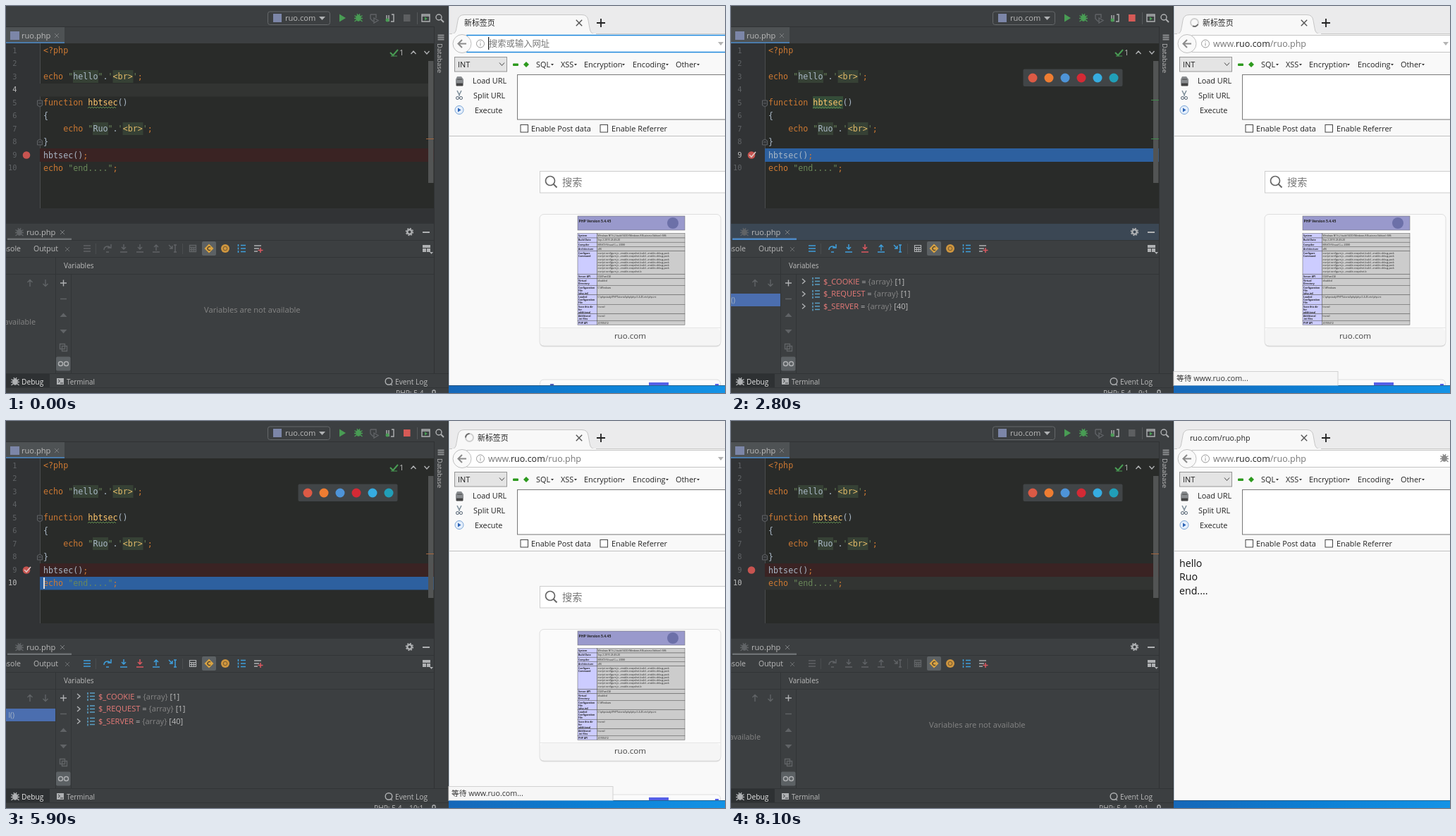
Write an HTML page that moves like this. It is 1020 px wide and 549 px high and loops after 8400 ms.

```html
<!DOCTYPE html>
<html lang="zh">
<head>
<meta charset="utf-8">
<title>PHP debugging</title>
<style>
html, body { margin: 0; width: 100%; height: 100%; overflow: hidden; background: #3c3f41; }
svg { display: block; width: 1020px; height: 549px; }
text { font: 10.2px "Open Sans", "Noto Sans CJK SC", sans-serif; fill: #bbb; white-space: pre; }
.m { font-size: 11.1px; }
.code text { font: 11.7px "DejaVu Sans Mono", monospace; fill: #a9b7c6; }
.nums text { font: 10.3px "DejaVu Sans Mono", monospace; fill: #606366; text-anchor: end; }
.nums .cur { fill: #b4b4b4; }
.code .k { fill: #cc7832; }
.code .s { fill: #6a8759; }
.code .g { fill: #e0b968; }
.code .f { fill: #ffc66d; }
.web text { font-size: 10.9px; fill: #222; }
.web .url { font-size: 12.5px; fill: #777; }
.web .dark { fill: #222; }
.web .page text { font-size: 14.2px; fill: #111; }
.tiny text { font-size: 3.4px; fill: #222; }
.tiny .b { font-weight: 700; }
.l { fill: none; stroke: #afb1b3; stroke-width: 1.4; }
.off { fill: none; stroke: #606366; stroke-width: 1.4; }
.blue { fill: none; stroke: #3f9fdb; stroke-width: 1.5; }
.var { fill: #e87b78; }
.dim { fill: #858585; }
.thin { fill: none; stroke: #999; stroke-width: 1; }
</style>
</head>
<body>
<svg viewBox="0 0 1020 549" xmlns="http://www.w3.org/2000/svg">
<defs>
  <linearGradient id="bar"><stop offset="0" stop-color="#1667b8"/><stop offset=".5" stop-color="#0c7fd4"/><stop offset="1" stop-color="#1493e6"/></linearGradient>
  <g id="bug"><ellipse rx="3.2" ry="4.2"/><path d="M-5.5-3.5l3 2M5.5-3.5l-3 2M-6 .5H6M-5.5 5l3-2.5M5.5 5L2.5 2.5M-2-6l1 2M2-6L1-4" fill="none" stroke-width="1.4"/></g>
  <g id="x"><path d="M-3-3L3 3M3-3L-3 3" fill="none" stroke-width="1"/></g>
  <g id="steps">
    <path d="M110 340h10M110 344h10M110 348h10"/>
    <path d="M139 346a5 5 0 0 1 9-3M149 338v5h-5M142 349h4"/>
    <path d="M167 338v7M164 342l3 3l3-3M162 349h10"/>
    <path d="M213 347v-7M210 342l3-3l3 3M208 349h10"/>
    <path d="M231 339l5 5M236 340v4h-4M240 339v10M238 339h4M238 349h4"/>
  </g>
  <g id="force"><path d="M190 338v7M187 342l3 3l3-3M185 349h10"/></g>
  <g id="calc"><path d="M260.500 339.500h9v9h-9zM260 342.500h10M263.500 342v6M266.500 342v6M260 345.500h10"/></g>
  <g id="list"><path d="M119 386h7M119 390.500h7M119 395h7M116 385v3M116 389.500v3M116 394v3" fill="none" stroke="#5a9fc4" stroke-width="1.5"/><path d="M101 387l4 3.500l-4 3.500" class="l"/></g>
</defs>

<!-- editor window -->
<rect width="628" height="549" fill="#3c3f41"/>
<path d="M0 29.500H607M607.500 29V522" stroke="#303234"/>
<rect x="371.500" y="8" width="88" height="18.500" rx="3" fill="none" stroke="#65686a"/>
<rect x="379" y="11" width="12" height="12" fill="#7c86a8"/>
<text class="m" x="396" y="21">ruo.com</text>
<path d="M444 15h9l-4.500 5z" fill="#afb1b3"/>
<path d="M473 11.500v11l9-5.500z" fill="#499c54"/>
<use href="#bug" x="500" y="17" fill="#499c54" stroke="#499c54"/>
<path d="M517 12h8v5M517 12v6l4 4M522 17l6 3.500l-6 3.500z" class="off"/>
<path d="M540 13v9M543 13v9M547 12h3v10h-4" class="l"/><circle cx="541" cy="20" r="2.500" fill="#499c54"/>
<rect x="564" y="12" width="9.500" height="10" fill="#5d5f61"/>
<rect data-on="2300 6700" x="564" y="12" width="9.500" height="10" fill="#d65a56"/>
<path d="M583.500 9V26" stroke="#55585a"/>
<path d="M590 12h11v10h-11zM590 14h11" class="l"/><path d="M594 15.500v5l4-2.500z" fill="#499c54"/>
<circle cx="614" cy="16" r="4" class="l"/><path d="M617 19l4 4" class="l" style="stroke-width:2"/>

<rect y="30" width="83" height="23" fill="#4e5254"/>
<rect y="51" width="83" height="2.500" fill="#4a88c7" opacity=".75"/>
<rect x="6" y="36" width="13" height="12" fill="#7c86a8"/>
<text class="m" x="22" y="46">ruo.php</text>
<use href="#x" x="72" y="42" stroke="#7b7e80"/>

<rect y="53" width="607" height="234" fill="#292b29"/>
<rect y="53" width="48" height="234" fill="#313335"/>
<path d="M48.500 53V287" stroke="#4a4c4d"/>
<rect y="287" width="607" height="21" fill="#313335"/>
<rect data-on="0 1600" x="48" y="110" width="552" height="18.500" fill="#323432"/>
<rect x="48" y="202" width="559" height="19" fill="#3a2323"/>
<rect data-on="1600 5400" x="48" y="202" width="559" height="19" fill="#2d609f"/>
<rect data-on="5400 6200" x="48" y="221" width="559" height="18.500" fill="#2d609f"/>
<rect data-on="6200 8400" x="48" y="221" width="552" height="18.500" fill="#323432"/>
<rect x="599" y="78" width="7.500" height="173" fill="#525454"/>
<path data-on="0 2300,5400 8400" d="M596 188.500H607" stroke="#a5663e"/>
<path data-on="2300 5400" d="M596 133.500H607M596 188.500H607" stroke="#3f8a4a"/>
<g fill="#364135">
  <rect x="95" y="91" width="36" height="18"/><rect x="151.500" y="91" width="29" height="18"/>
  <rect x="123" y="165" width="22" height="18"/><rect x="165.500" y="165" width="29" height="18"/>
  <rect data-on="2300 5400" x="116" y="128" width="43" height="18" fill="#344c38"/>
</g>
<path id="wave" fill="none" stroke="#5f8a4f"/>
<g class="nums" id="nums"></g>
<g class="code">
  <text class="k" x="53" y="67">&lt;?php</text>
  <text x="53" y="104"><tspan class="k">echo </tspan><tspan class="s">"</tspan>hello<tspan class="s">"</tspan>.<tspan class="s">'</tspan><tspan class="g">&lt;br&gt;</tspan><tspan class="s">'</tspan><tspan class="k">;</tspan></text>
  <text x="53" y="141"><tspan class="k">function </tspan><tspan class="f">hbtsec</tspan>()</text>
  <text x="53" y="160">{</text>
  <text x="53" y="178"><tspan class="k">    echo </tspan><tspan class="s">"</tspan>Ruo<tspan class="s">"</tspan>.<tspan class="s">'</tspan><tspan class="g">&lt;br&gt;</tspan><tspan class="s">'</tspan><tspan class="k">;</tspan></text>
  <text x="53" y="197">}</text>
  <text x="53" y="215.500">hbtsec()<tspan class="k">;</tspan></text>
  <text x="53" y="234"><tspan class="k">echo </tspan><tspan class="s">"end...."</tspan><tspan class="k">;</tspan></text>
</g>
<path d="M44.500 134h7v7l-3.500 2l-3.500-2zM46 138h4M44.500 197h7v-6l-3.500-2l-3.500 2zM46 193h4" fill="#313335" stroke="#606366"/>
<rect data-on="5400 7100,7600 8100" x="53" y="222" width="2" height="16" fill="#ddd"/>
<circle cx="29" cy="211.500" r="5.300" fill="#c75450"/>
<path data-on="1900 6500" d="M26 211l3 3l6-7" fill="none" stroke="#dfc7c4" stroke-width="1.600"/>
<rect x="539" y="56" width="68" height="20" fill="#292b29"/>
<path d="M545 66l4 4l7-8" fill="none" stroke="#499c54" stroke-width="2"/><path d="M546 71h9" stroke="#499c54"/>
<text class="m" x="558" y="70">1</text>
<path d="M574.500 68l3.500-4l3.500 4M593.500 64l3.500 4l3.500-4" class="l"/>
<g id="popup">
  <rect x="414.500" y="89.500" width="141" height="24.500" rx="2" fill="#414547"/>
  <circle cx="428" cy="102" r="6.500" fill="#dc5a45"/><circle cx="451" cy="102" r="6.500" fill="#ee7d32"/>
  <circle cx="474" cy="102" r="6.500" fill="#4e94d8"/><circle cx="497" cy="102" r="6.500" fill="#d42a35"/>
  <circle cx="520" cy="102" r="6.500" fill="#36ace0"/><circle cx="543" cy="102" r="6.500" fill="#219fb8"/>
</g>
<path d="M612 40h10v9h-10zM612 43h10M612 46h10" fill="#8b8e90" stroke="#3c3f41"/>
<text transform="translate(612 53) rotate(90)" style="font-size:9.600px">Database</text>

<!-- debug panel -->
<rect data-on="1900 5400" y="308" width="607" height="24" fill="#3b4754"/>
<path d="M0 308.500H607M0 332.500H607M0 356.500H607M0 380.500H607M70.500 357V521M92.500 380V521M0 521.500H628" stroke="#323537"/>
<rect x="2" y="329.500" width="91" height="2.500" fill="#6c7073"/>
<rect data-on="1900 5400" x="2" y="329.500" width="91" height="2.500" fill="#4a88c7"/>
<use href="#bug" x="19" y="321" fill="#606366" stroke="#606366"/>
<text class="m" x="29" y="325">ruo.php</text>
<use href="#x" x="80" y="321" stroke="#7b7e80"/>
<circle cx="572.500" cy="320.500" r="3.200" class="l" style="stroke-width:2.400"/><circle cx="572.500" cy="320.500" r="5" class="l" stroke-dasharray="2 1.900"/>
<path d="M591 321h10" class="l" style="stroke-width:2"/>
<text x="21" y="348" text-anchor="end" style="font-size:10.500px">Console</text>
<text x="39" y="348" style="font-size:10.500px">Output</text>
<use href="#x" x="87" y="345" stroke="#6b6e70"/>
<path d="M127.500 337v15M250.500 337v15" stroke="#4a4d4f"/>
<g data-on="0 1900,6200 8400" class="off"><use href="#steps"/><use href="#force"/><use href="#calc"/></g>
<g data-on="1900 6200"><use href="#steps" class="blue"/><use href="#force" class="blue" style="stroke:#db5860"/><use href="#calc" class="l" style="stroke-width:1.200"/></g>
<rect x="278" y="334" width="20" height="20" rx="2" fill="#5c6164"/>
<path d="M288 337.500l6.500 6.500l-6.500 6.500l-6.500-6.500z" fill="#d9a343"/><path d="M290 342a2.500 2.500 0 1 0 0 4" fill="none" stroke="#4b4030" stroke-width="1.300"/>
<circle cx="311" cy="344" r="6" fill="#cf963f"/><circle cx="311" cy="344" r="2.800" fill="none" stroke="#75592e"/>
<path d="M333 339.500h7M333 344h7M333 348.500h7M329.500 338v3M329.500 342.500v3M329.500 347v3" class="blue"/>
<path d="M352 340h10M352 344h7M352 348h5" class="l"/><path d="M361 343v7M357.500 346.500h7" stroke="#db5860" stroke-width="1.500"/>
<path d="M591 339h11v4h-11zM591 344h5v5h-5zM597 344h5v5h-5z" fill="#afb1b3"/><path d="M601 349h5l-2.500 3z" fill="#afb1b3"/>
<text x="82" y="372" style="font-size:10px">Variables</text>
<path d="M34 398v-9M30.500 392l3.500-3.500l3.500 3.500M56 388v9M52.500 394l3.500 3.500l3.500-3.500" class="off"/>
<path d="M77 393h9M81.500 388.500v9" class="l"/><path d="M77 415.500h9" class="off"/>
<path d="M76.500 441l5-5.500l5 5.500zM76.500 459l5 5.500l5-5.500z" fill="#606366"/>
<path d="M76.500 479.500h7v7h-7zM79.500 482.500h7v7h-7z" class="off"/>
<rect x="71" y="497.500" width="20.500" height="20" rx="2" fill="#5c6164"/>
<circle cx="77.500" cy="507.500" r="3" class="l"/><circle cx="85.500" cy="507.500" r="3" class="l"/>
<g data-on="0 1900,6200 8400">
  <text class="dim" x="42" y="452" text-anchor="end" style="font-size:10.800px">not available</text>
  <text class="dim" x="281" y="435" style="font-size:11.200px">Variables are not available</text>
</g>
<g data-on="1900 6200">
  <rect y="408" width="70" height="18" fill="#4b6eaf"/>
  <text data-on="1900 5400" x="6" y="421" text-anchor="end" font-style="italic" style="fill:#a9b7c6">()</text>
  <text data-on="5400 6200" x="12" y="421" text-anchor="end" font-style="italic" style="fill:#a9b7c6">l()</text>
  <use href="#list"/><use href="#list" y="18"/><use href="#list" y="35.500"/>
  <text class="m" x="131" y="394.500"><tspan class="var">$_COOKIE</tspan> = <tspan class="dim">{array}</tspan> [1]</text>
  <text class="m" x="131" y="412"><tspan class="var">$_REQUEST</tspan> = <tspan class="dim">{array}</tspan> [1]</text>
  <text class="m" x="131" y="430"><tspan class="var">$_SERVER</tspan> = <tspan class="dim">{array}</tspan> [40]</text>
</g>
<rect y="522" width="62" height="19" fill="#2e3133"/>
<use href="#bug" x="13" y="533" fill="#afb1b3" stroke="#afb1b3"/>
<text x="22" y="537" style="fill:#e4e4e4">Debug</text>
<rect x="72" y="528" width="10" height="9" fill="#afb1b3"/><path d="M74 530l2.500 2l-2.500 2M77 535h4" fill="none" stroke="#3c3f41"/>
<text x="86" y="537" style="font-size:9.900px">Terminal</text>
<circle cx="543" cy="532.500" r="4.800" class="l"/><path d="M545 536l3 2" class="l"/>
<text x="552" y="537">Event Log</text>
<path d="M0 541.500H628" stroke="#323537"/>
<text data-on="0 1900" x="553" y="553">PHP: 5.4</text>
<text data-on="1900 5400" x="528" y="553">PHP: 5.4    9:1</text>
<text data-on="5400 8400" x="522" y="553">PHP: 5.4    10:1</text>
<path d="M605 549v-2a2 2 0 0 1 4 0v2" class="l"/>

<!-- browser window -->
<g class="web">
  <rect x="628" width="392" height="538" fill="#f9f9f9"/>
  <rect x="628" width="392" height="39" fill="#ebebec"/>
  <path d="M628 39.500h5q5 0 6-8l2-11q1-8 9-8h167q8 0 9 8l2 11q1 8 7 8h185" fill="#f8f8f8" stroke="#c6c6c6"/>
  <path d="M633 40h204" stroke="#f8f8f8" stroke-width="2"/>
  <path d="M628.500 0V538" stroke="#b9c6d2"/>
  <use href="#x" transform="translate(813 24) scale(1.400)" stroke="#555"/>
  <path d="M838 24h12M844 18v12" stroke="#222" stroke-width="1.800"/>
  <text data-on="0 1300" x="650" y="27.500">新标签页</text>
  <g data-on="1300 6200">
    <text x="669" y="27.500">新标签页</text>
    <circle cx="657.500" cy="23.500" r="5.500" fill="none" stroke="#cfcfcf" stroke-width="2"/>
    <path id="spin" d="M657.500 18a5.500 5.500 0 0 1 5.500 5.500" fill="none" stroke="#6d6d6d" stroke-width="2"/>
  </g>
  <text data-on="6200 8400" x="651" y="27.500" style="font-size:10.700px">ruo.com/ruo.php</text>

  <rect x="654" y="41.500" width="372" height="24" fill="#fff" stroke="#c4c4c4"/>
  <rect data-on="0 1300" x="654" y="41.500" width="372" height="24" fill="#fff" stroke="#1b86dc" stroke-width="1.500"/>
  <circle cx="647" cy="53.500" r="13" fill="#f9f9f9" stroke="#c0c0c0"/>
  <path d="M653 53.500h-11M647 48l-5.500 5.500l5.500 5.500" fill="none" stroke="#8b8b8b" stroke-width="2"/>
  <circle cx="673" cy="53.500" r="5.500" class="thin"/><path d="M673 52.500v4M673 50v1.300" class="thin"/>
  <rect data-on="0 400" x="684" y="44" width="1.300" height="18" fill="#222"/>
  <text data-on="0 900" x="685" y="58" font-style="italic" style="font-size:12.300px;fill:#777">搜索或输入网址</text>
  <text data-on="900 8400" class="url" x="684" y="58">www.<tspan class="dark">ruo.com</tspan>/ruo.php</text>
  <path data-on="0 6200" d="M1010 51h8l-4 5z" fill="#b4b4b4"/>
  <use data-on="6200 8400" href="#bug" x="1012" y="53" fill="#8a8a8a" stroke="#8a8a8a"/>

  <rect x="636.500" y="72.500" width="74" height="20.500" fill="#e4e4e4" stroke="#969696"/>
  <text x="641" y="87">INT</text>
  <path d="M700 80.500l3.500 4l3.500-4" fill="none" stroke="#444"/>
  <rect x="719" y="81.500" width="8" height="3.500" rx="1" fill="#2d9a1e"/>
  <path d="M738 79l4 4l-4 4l-4-4z" fill="#2d9a1e"/>
  <g id="menu"></g>
  <path d="M638 104l2-4h6l3 4v6h-11z" fill="#8a8d90"/><path d="M639 110h9v3h-9zM640 104h7" fill="#444" stroke="#444"/>
  <path d="M640 120l3 6l3-6M643 126v2" fill="none" stroke="#7d8d99" stroke-width="1.500"/><circle cx="640.500" cy="130.500" r="2" class="thin" style="stroke:#456"/><circle cx="645.500" cy="130.500" r="2" class="thin" style="stroke:#456"/>
  <circle cx="643" cy="147.500" r="6" fill="#e5effb" stroke="#7ba6d8"/><path d="M641 144.500v6l4.500-3z" fill="#2a62b5"/>
  <text x="662" y="109.500">Load URL</text><text x="663" y="130.500">Split URL</text><text x="665" y="151.500">Execute</text>
  <rect x="725.500" y="97.500" width="300" height="63.500" fill="#fff" stroke="#777"/>
  <rect x="730" y="168.500" width="10.500" height="10.500" fill="#fff" stroke="#444"/><text x="745" y="178">Enable Post data</text>
  <rect x="843" y="168.500" width="10.500" height="10.500" fill="#fff" stroke="#444"/><text x="859" y="178">Enable Referrer</text>
  <path d="M628 184.500H1020" stroke="#c2c2c2"/>

  <g data-on="0 6200">
    <rect x="757.500" y="234.500" width="270" height="30.500" fill="#fff" stroke="#cdcdcd"/>
    <circle cx="772" cy="248" r="6.500" fill="none" stroke="#666" stroke-width="1.700"/><path d="M776.500 252.500l5 5" stroke="#666" stroke-width="2"/>
    <text x="789" y="254.500" style="font-size:14.200px;fill:#777">搜索</text>
    <rect x="757" y="296.500" width="257" height="187" rx="6" fill="#d9d9d9"/>
    <rect x="757" y="295.500" width="257" height="186.500" rx="6" fill="#fbfbfb" stroke="#dedede"/>
    <path d="M757 456.500H1014" stroke="#e6e6e6"/>
    <rect x="758" y="457" width="255" height="24" rx="5" fill="#f5f5f5"/>
    <text x="885.500" y="472" text-anchor="middle" style="font-size:11.600px;fill:#444">ruo.com</text>
    <g class="tiny" id="info">
      <rect x="811" y="298" width="152" height="156" fill="#fff"/>
      <rect x="811" y="298" width="152" height="20" fill="#9999cc" stroke="#666" stroke-width=".5"/>
      <text class="b" x="812.500" y="307" style="font-size:5px">PHP Version 5.4.45</text>
      <circle cx="946" cy="308" r="8" fill="#6c70a8"/>
    </g>
    <path d="M757.500 538v-2q0-6 6-6h244q6 0 6 6v2" fill="#fbfbfb" stroke="#dedede"/>
    <rect x="912" y="534" width="28" height="4" fill="#5560e8"/><rect x="772" y="536" width="5" height="2" fill="#5560b8"/><rect x="1006" y="536" width="5" height="2" fill="#5560e8"/>
  </g>
  <g data-on="1300 6200">
    <rect x="628" y="518.500" width="233" height="20" fill="#f6f6f6" stroke="#d2d2d2"/>
    <text x="632" y="532" style="font-size:10.700px;fill:#333">等待 www.ruo.com...</text>
  </g>
  <g class="page" data-on="6200 8400">
    <text x="636" y="207">hello</text><text x="636" y="226">Ruo</text><text x="636" y="246">end....</text>
  </g>
  <rect x="628" y="538.500" width="392" height="11" fill="url(#bar)"/>
</g>
</svg>
<script>
const LOOP = 8400;
const $ = id => document.getElementById(id);
const add = (parent, name, attrs, text = '') => {
  const el = document.createElementNS('http://www.w3.org/2000/svg', name);
  for (const key in attrs) el.setAttribute(key, attrs[key]);
  el.textContent = text;
  parent.append(el);
};

// Line numbers; the current line gets a brighter copy.
const current = { 4: '0 1600', 9: '1600 5400', 10: '5400 8400' };
for (let n = 1; n <= 10; n++) {
  const at = { x: 15.5, y: 66.5 + (n - 1) * 18.55 };
  add($('nums'), 'text', at, n);
  if (current[n]) add($('nums'), 'text', { ...at, class: 'cur', 'data-on': current[n] }, n);
}

$('wave').setAttribute('d', 'M116 145' + 'l2-2l2 2'.repeat(10));

// Menu entries with small drop-down arrows.
const menu = { SQL: [752, 773], XSS: [787, 806], Encryption: [820, 874], Encoding: [889, 936], Other: [950, 980] };
for (const name in menu) {
  const [x, arrow] = menu[name];
  add($('menu'), 'text', { x, y: 87 }, name);
  add($('menu'), 'path', { d: `M${arrow} 82h4l-2 2.500z`, fill: '#333' });
}

// Rows of the page preview: label, value, height.
const long = 'cscript configure.js --enable-snapshot-build --enable-debug-pack';
const rows = [
  ['System', 'Windows NT 6.2 build 9200 (Windows 8 Business Edition) i586', 6.5],
  ['Build Date', 'Sep 2 2015 23:45:20', 6.2],
  ['Compiler', 'MSVC9 (Visual C++ 2008)', 6.2],
  ['Architecture', 'x86', 6.2],
  ['Configure Command', long, 33],
  ['Server API', 'CGI/FastCGI', 6.2],
  ['Virtual Directory Support', 'disabled', 9.5],
  ['Configuration File (php.ini) Path', 'C:\\Windows', 13.5],
  ['Loaded Configuration File', 'C:\\phpstudy\\PHPTutorial\\php\\php-5.4.45-nts\\php.ini', 13.5],
  ['Scan this dir for additional .ini files', '(none)', 13.5],
  ['Additional .ini files parsed', '(none)', 9.5],
  ['PHP API', '20100412', 6.2]
];
let y = 322.5;
for (const [label, value, h] of rows) {
  const box = { y, height: h, stroke: '#555', 'stroke-width': .5 };
  add($('info'), 'rect', { ...box, x: 811, width: 27.5, fill: '#ccccff' });
  add($('info'), 'rect', { ...box, x: 838.5, width: 124.5, fill: '#cccccc' });
  label.match(/.{1,13}(\s|$)/g).forEach((part, i) =>
    add($('info'), 'text', { x: 812, y: y + 4.3 + i * 4, class: 'b' }, part.trim()));
  const count = value === long ? 7 : 1;
  for (let i = 0; i < count; i++)
    add($('info'), 'text', { x: 839.5, y: y + 4.3 + i * 4.3 }, i === count - 1 && i ? value.slice(0, 40) : value);
  y += h;
}

const timed = [...document.querySelectorAll('[data-on]')].map(el => ({
  el, spans: el.dataset.on.split(',').map(s => s.split(' ').map(Number))
}));

// Linear interpolation through [time, value] points.
const fade = [[2299, 0], [2300, 1], [6200, 1], [6400, .33], [6550, 0], [7050, 0], [7400, 1], [LOOP, 1]];
function level(t) {
  const i = fade.findIndex(p => t < p[0]);
  if (i < 1) return 0;
  const [[a, u], [b, v]] = [fade[i - 1], fade[i]];
  return u + (v - u) * (t - a) / (b - a);
}

function draw() {
  const t = performance.now() % LOOP;
  for (const { el, spans } of timed)
    el.style.display = spans.some(([a, b]) => t >= a && t < b) ? '' : 'none';
  $('popup').setAttribute('opacity', level(t));
  $('spin').setAttribute('transform', `rotate(${(t - 1700) / 700 * 360 - 90} 657.5 23.5)`);
  requestAnimationFrame(draw);
}
draw();
</script>
</body>
</html>
```
